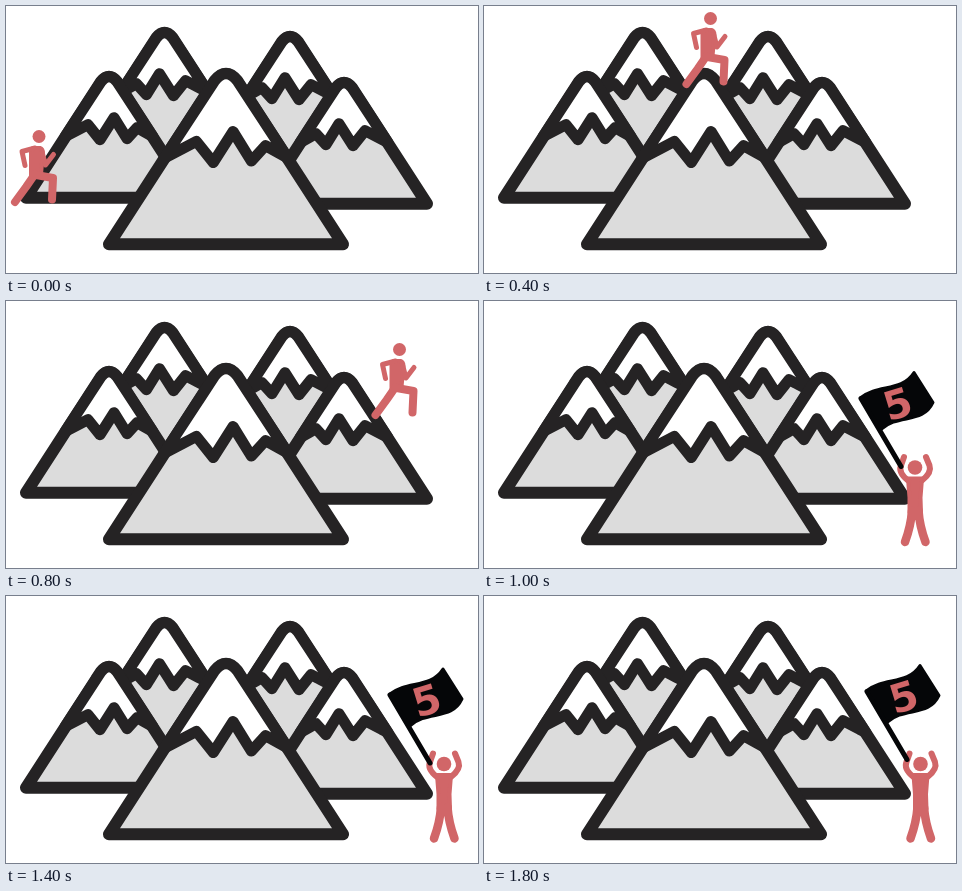
These frames come from a looping animation (472 by 267 pixels, 2 s). An HTML page:

```html
<!DOCTYPE html>
<html lang="en">
<head>
<meta charset="utf-8">
<title>Over the mountains</title>
<style>
  html, body { margin: 0; width: 100%; height: 100%; overflow: hidden; background: #fff; }
  svg { display: block; }
  .mountain { fill: #dcdcdc; stroke: #252324; stroke-width: 12; }
  .mountain path { vector-effect: non-scaling-stroke; }
  .snow { fill: #fff; stroke-width: 11; }
  .person { fill: #d16668; stroke: #d16668; }
  .limb { fill: none; }
  .flag { fill: #050608; stroke: #050608; }
  text { font: bold 40px "DejaVu Sans", sans-serif; fill: #d16668; text-anchor: middle; }
</style>
</head>
<body>
<svg width="472" height="267" stroke-linejoin="round" stroke-linecap="round">
  <defs>
    <g id="mountain" class="mountain">
      <path d="M-83 121L-8 5Q0-5 8 5L83 121Z"/>
      <path class="snow" d="M-44 60L-8 5Q0-5 8 5L44 60L28 51L18 62L5 41L-9 63L-21 48Z"/>
    </g>
  </defs>

  <use href="#mountain" transform="translate(158.5 26.7) scale(-1 1)"/>
  <use href="#mountain" transform="translate(284 30.7) scale(-1 1)"/>
  <use href="#mountain" transform="translate(103 70.7)"/>
  <use href="#mountain" transform="translate(338 76.7) scale(-1 1)"/>
  <use href="#mountain" transform="translate(220 67.7) scale(1.41)"/>

  <g id="runner" class="person">
    <circle cx="33" cy="130.5" r="6.5" stroke="none"/>
    <path stroke-width="4" d="M27 142L34 142Q37 143 37 147L35 168L25 170L25 144Z"/>
    <path class="limb" stroke-width="5" d="M29 142L16 145.5L19 159.5M36 146L39.5 159L47.5 148.5"/>
    <path class="limb" stroke-width="8" d="M29 168L20 181L9 196M30 169L47 172L46 193.5"/>
  </g>

  <g id="climber" class="person">
    <circle cx="434" cy="142" r="7.3" stroke="none"/>
    <path stroke-width="4" d="M427 153L441 153L439.5 172L440 187L428.500 187L428.500 172Z"/>
    <path class="limb" stroke-width="6" d="M427 155Q417 147 420 140L423 131.500M441 155Q451 147 448.500 140L445 131.500"/>
    <path class="limb" stroke-width="8.500" d="M431 185Q430 200 424 216.500M437.500 185Q438.500 200 444.500 216.500"/>
  </g>

  <g id="banner">
    <g class="flag">
      <path stroke-width="5" d="M380 73L420 141"/>
      <path stroke-width="3" d="M380 72C397 58 420 67 433 47L452 77C442 99 417 88 400 104Z"/>
    </g>
    <text transform="translate(416.500 78) rotate(-17)" y="14.500">5</text>
  </g>
</svg>
<script>
  const STEP = 200;
  const runs = [[0, 0], [81, -120], [193.5, -118], [307, -114.5], [360.5, -82]];
  const jumps = [[-3, 24.5], [0, 0], [4, 26], [6, -25.5], [2.5, 26]];
  const flags = [...jumps.slice(0, -1), [3, 22.5]]; // raised on the last jump
  const [runner, climber, banner] =
    ["runner", "climber", "banner"].map(id => document.getElementById(id));

  function place(figure, offset) {
    figure.style.display = offset ? "" : "none";
    if (offset) figure.setAttribute("transform", `translate(${offset})`);
  }

  function draw(now) {
    const step = Math.floor(now / STEP) % (runs.length + jumps.length);
    place(runner, runs[step]);
    place(climber, jumps[step - runs.length]);
    place(banner, flags[step - runs.length]);
    requestAnimationFrame(draw);
  }
  draw(performance.now());
</script>
</body>
</html>
```
